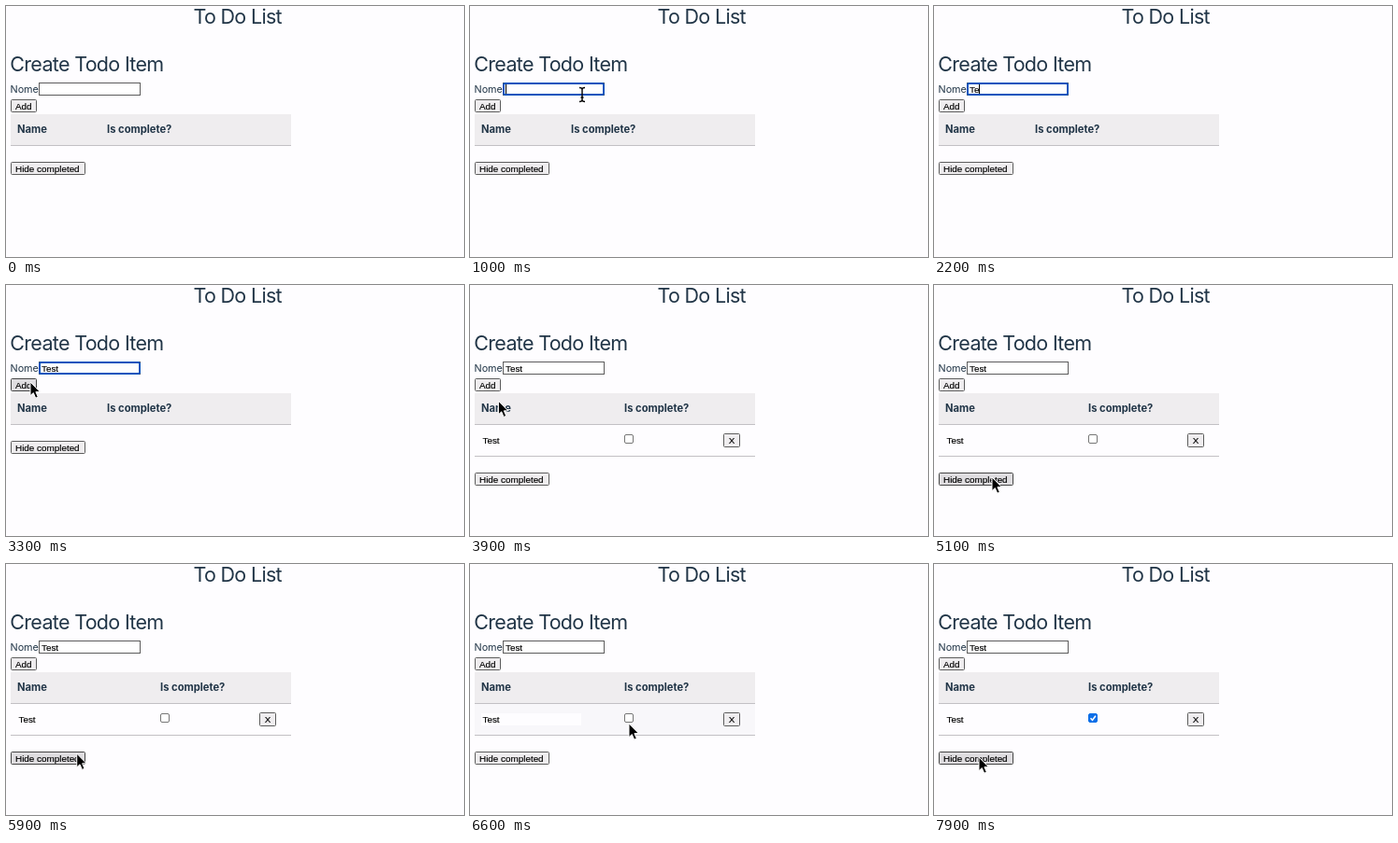
These frames come from a looping animation (490x269 px, 8000 ms). An HTML page:

```html
<!DOCTYPE html>
<html lang="en">
<head>
<meta charset="utf-8">
<title>To Do List</title>
<style>
html, body { margin: 0; width: 100%; height: 100%; overflow: hidden; background: #fefdff; }
svg { display: block; width: 490px; height: 269px; }
text { font: 9.9px "Liberation Sans", Arial, sans-serif; fill: #000; stroke: #000; stroke-width: .15px; white-space: pre; }
.title, .label, .head { font: 21.5px Inter, sans-serif; fill: #213547; stroke: none; }
.title { letter-spacing: -.032em; }
.label { font-size: 10.8px; }
.head { font-size: 11.2px; font-weight: 700; }
.btn rect { fill: #efedef; stroke: #5c5c5c; rx: 1px; }
.btn.hot rect { fill: #dfdde0; stroke: #444; }
.line { fill: #c2c0c4; }
</style>
</head>
<body>
<svg viewBox="0 0 490 269">
  <text class="title" x="247.7" y="18.8" text-anchor="middle">To Do List</text>
  <text class="title" x="4.3" y="70">Create Todo Item</text>
  <text class="label" x="4.5" y="93">Nome</text>

  <rect id="field" x="35.5" y="82.5" width="108" height="13" fill="#fff" stroke="#5c5c5c"/>
  <rect id="ring" x="36" y="83" width="107" height="12" rx="1.5" fill="#fff" stroke="#0a55bd" stroke-width="2"/>
  <text id="typed" x="38" y="93"></text>
  <rect id="caret" y="84" width="1" height="10"/>

  <g class="btn" id="add">
    <rect x="5.5" y="100.5" width="27" height="13"/>
    <text x="10" y="111">Add</text>
  </g>

  <rect x="5" y="116" width="300" height="33" fill="#efedef"/>
  <rect class="line" x="5" y="149" width="300" height="1"/>
  <text class="head" x="12" y="136">Name</text>
  <text class="head" id="status" y="136">Is complete?</text>

  <g id="row">
    <rect id="tint" x="5" y="150" width="300" height="33" fill="#f8f7fa"/>
    <rect x="12" y="160" width="107" height="13" fill="#fefdff"/>
    <text x="13.5" y="170">Test</text>
    <rect id="box" x="165.5" y="160.5" width="9" height="9" rx="1.5"/>
    <path id="check" d="M167.5 165.2l2 2.1 3.4-4.6" fill="none" stroke="#fff" stroke-width="1.5"/>
    <g class="btn">
      <rect x="271.5" y="159.5" width="17" height="14"/>
      <text x="280" y="170" text-anchor="middle">X</text>
    </g>
    <rect class="line" x="5" y="183" width="300" height="1"/>
  </g>

  <g class="btn" id="hide">
    <rect x="5.5" y="167.5" width="79" height="13"/>
    <text x="10" y="178">Hide completed</text>
  </g>

  <g id="cursor">
    <path id="arrow" d="M0 0V14.6L3.3 11.6L5.7 17.2L8.3 16.1L5.9 10.6H10.4Z" stroke="#fff" stroke-linejoin="round"/>
    <path id="beam" d="M-3 -7.5Q0 -7.5 0 -5.5Q0 -7.5 3 -7.5M0 -5.5V5.5M-3 7.5Q0 7.5 0 5.5Q0 7.5 3 7.5M-1.5 3H1.5" fill="none" stroke="#000" stroke-width="1.4"/>
  </g>
</svg>
<script>
const $ = id => document.getElementById(id);
const show = (id, on) => $(id).style.display = on ? "" : "none";
const LOOP = 8000, STEP = 100;
const ENTER = 400, FOCUS = 1000, BLUR = 3800, ADDED = 3900, CHECKED = 7000;
const WORD = "Test", KEYS = [1900, 2200, 2400, 2500];

// pointer gestures: begin, end, target x, target y
const moves = [
  [300, 800, 120, 95],     // into the field
  [2900, 3300, 26, 104],   // to Add
  [3700, 4300, 43, 182],   // past the new row
  [4300, 4500, 56, 232],
  [4500, 5100, 62, 206],   // to Hide completed
  [5200, 5500, 69, 198],
  [5800, 6100, 95, 218],
  [6100, 6600, 170, 171],  // to the checkbox
  [7000, 7500, 171, 193],
  [7600, 7900, 48, 207]    // back to Hide completed
];
const ease = k => k * k * (3 - 2 * k);

function pointAt(t) {
  let x = 98, y = 270;
  for (const [from, to, tx, ty] of moves) {
    const k = ease(Math.min(1, Math.max(0, (t - from) / (to - from))));
    x += (tx - x) * k;
    y += (ty - y) * k;
  }
  return [x, y];
}

function draw(now) {
  const t = Math.floor(now % LOOP / STEP) * STEP;
  const [x, y] = pointAt(t);
  const seen = t >= ENTER && (t < KEYS[0] || t >= 3000);
  const over = (l, top, r, b) => seen && x >= l && x < r && y >= top && y < b;

  const inField = over(35, 82, 144, 97);
  show("cursor", seen);
  $("cursor").setAttribute("transform", `translate(${x} ${y})`);
  show("arrow", !inField);
  show("beam", inField);

  // the caret restarts its blink at each key
  const pressed = KEYS.filter(k => t >= k);
  const focused = t >= FOCUS && t < BLUR;
  const since = t - (pressed.at(-1) ?? FOCUS);
  $("typed").textContent = WORD.slice(0, pressed.length);
  $("caret").setAttribute("x", 38 + Math.round($("typed").getComputedTextLength()));
  show("caret", focused && since % 1000 < 500);
  show("ring", focused);

  const added = t >= ADDED, shift = added ? 34 : 0;
  show("row", added);
  show("tint", over(5, 150, 305, 182));
  $("status").setAttribute("x", added ? 165 : 108);
  $("hide").setAttribute("transform", `translate(0 ${shift})`);
  $("hide").classList.toggle("hot", over(5, 167 + shift, 85, 181 + shift));
  $("add").classList.toggle("hot", over(5, 100, 33, 114));

  const checked = t >= CHECKED;
  $("box").setAttribute("fill", checked ? "#0d6fe8" : "#fff");
  $("box").setAttribute("stroke", checked ? "#0d6fe8" : "#767676");
  show("check", checked);
}

const start = performance.now();
function tick() {
  draw(performance.now() - start);
  requestAnimationFrame(tick);
}
tick();
</script>
</body>
</html>
```
